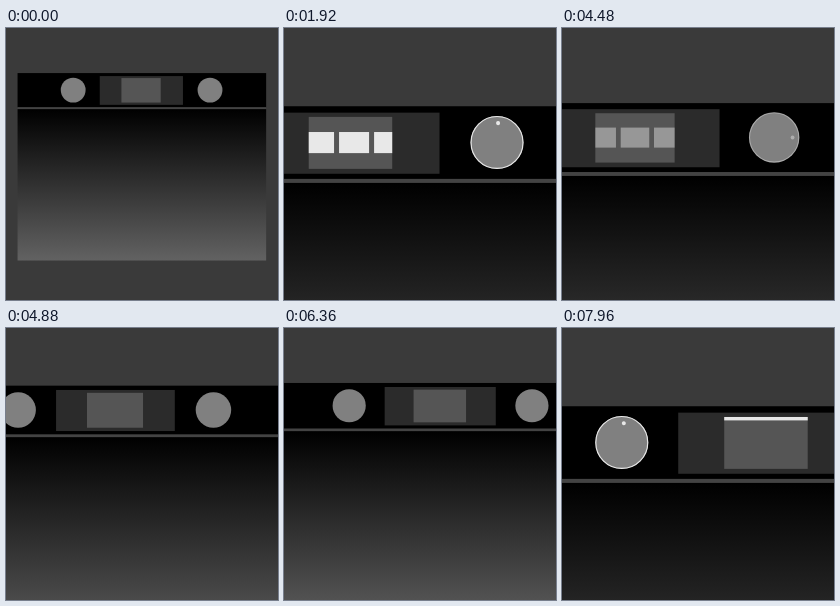
Write an HTML page that moves like this. It is 272 by 272 pixels and loops after 8000 ms.

```html
<!DOCTYPE html>
<html>
<head>
<meta charset="utf-8">
<style>
html, body { margin: 0; width: 100%; height: 100%; overflow: hidden; background: #3a3a3a; }
svg { display: block; width: 100%; height: 100%; }
</style>
</head>
<body>
<svg viewBox="0 0 272 272">
  <defs>
    <linearGradient id="glass" x1="0" y1="0" x2="0" y2="1">
      <stop offset="0" stop-color="#000"/>
      <stop offset="1" stop-color="#626262"/>
    </linearGradient>
    <clipPath id="view"><rect x="115.6" y="50" width="39.2" height="24.4"/></clipPath>
  </defs>
  <rect width="272" height="272" fill="#3a3a3a"/>
  <g id="oven">
    <rect x="12" y="45" width="248" height="34.2" fill="#000"/>
    <rect x="12" y="79.1" width="248" height="1.9" fill="#434343"/>
    <rect x="12" y="81" width="248" height="151" fill="url(#glass)"/>
    <rect x="94" y="48" width="83" height="28.7" fill="#2b2b2b"/>
    <rect x="115.6" y="50" width="39.2" height="24.4" fill="#555"/>
    <g clip-path="url(#view)" fill="#e8e8e8">
      <g id="tiles"></g>
      <rect id="level" x="115" y="50" width="41"/>
    </g>
    <g id="left" transform="translate(67.5 62)"></g>
    <g id="right" transform="translate(204 62)"></g>
  </g>
</svg>
<script>
const LOOP = 8000, ZOOM = 1060, STEP = 400, PITCH = 16.45;
const $ = id => document.getElementById(id);
const ramp = (t, start, span) => Math.min(1, Math.max(0, (t - start) / span));
const ease = x => (1 - Math.cos(Math.PI * x)) / 2;

for (const id of ['left', 'right']) {
  $(id).innerHTML = `<circle r="12.4" fill="#808080"/>
    <g class="mark"><circle r="12.2" fill="none" stroke="#e8e8e8" stroke-width=".55"/>
    <circle class="dot" cy="-9.1" r=".95" fill="#e8e8e8"/></g>`;
}
$('tiles').innerHTML = [-5, -4, -3, -2, -1, 0, 1, 2].map(i =>
  `<rect x="${135.2 - 7.05 + i * PITCH}" y="57.1" width="14.1" height="9.9"/>`).join('');

function setKnob(id, opacity, turns) {
  $(id).querySelector('.mark').setAttribute('opacity', opacity);
  $(id).querySelector('.dot').setAttribute('transform', `rotate(${turns * 30})`);
}

function draw(t) {
  const second = t >= 5900;
  const zoom = second ? ease(ramp(t, 5970, ZOOM))
    : ease(ramp(t, -30, ZOOM)) - ease(ramp(t, 4270, ZOOM));
  const scale = 1 + 1.13 * zoom;
  const tx = (second ? -84 : -221.5) * zoom;
  $('oven').setAttribute('transform', `matrix(${scale} 0 0 ${scale} ${tx} ${-17.6 * zoom})`);

  const turns = [1880, 2680, 3480].reduce((sum, s) => sum + ramp(t, s, STEP), 0);
  const shown = ramp(t, 1000, STEP) - ramp(t, 4260, STEP);
  setKnob('right', shown, turns);
  $('tiles').setAttribute('opacity', shown);
  $('tiles').setAttribute('transform', `translate(${turns * PITCH} 0)`);

  const rise = ramp(t, 7880, STEP);
  setKnob('left', ramp(t, 7000, STEP), rise);
  $('level').setAttribute('height', rise * 8.1);
}

const begin = performance.now();
function tick() {
  draw((performance.now() - begin) % LOOP);
  requestAnimationFrame(tick);
}
draw(0);
requestAnimationFrame(tick);
</script>
</body>
</html>
```
